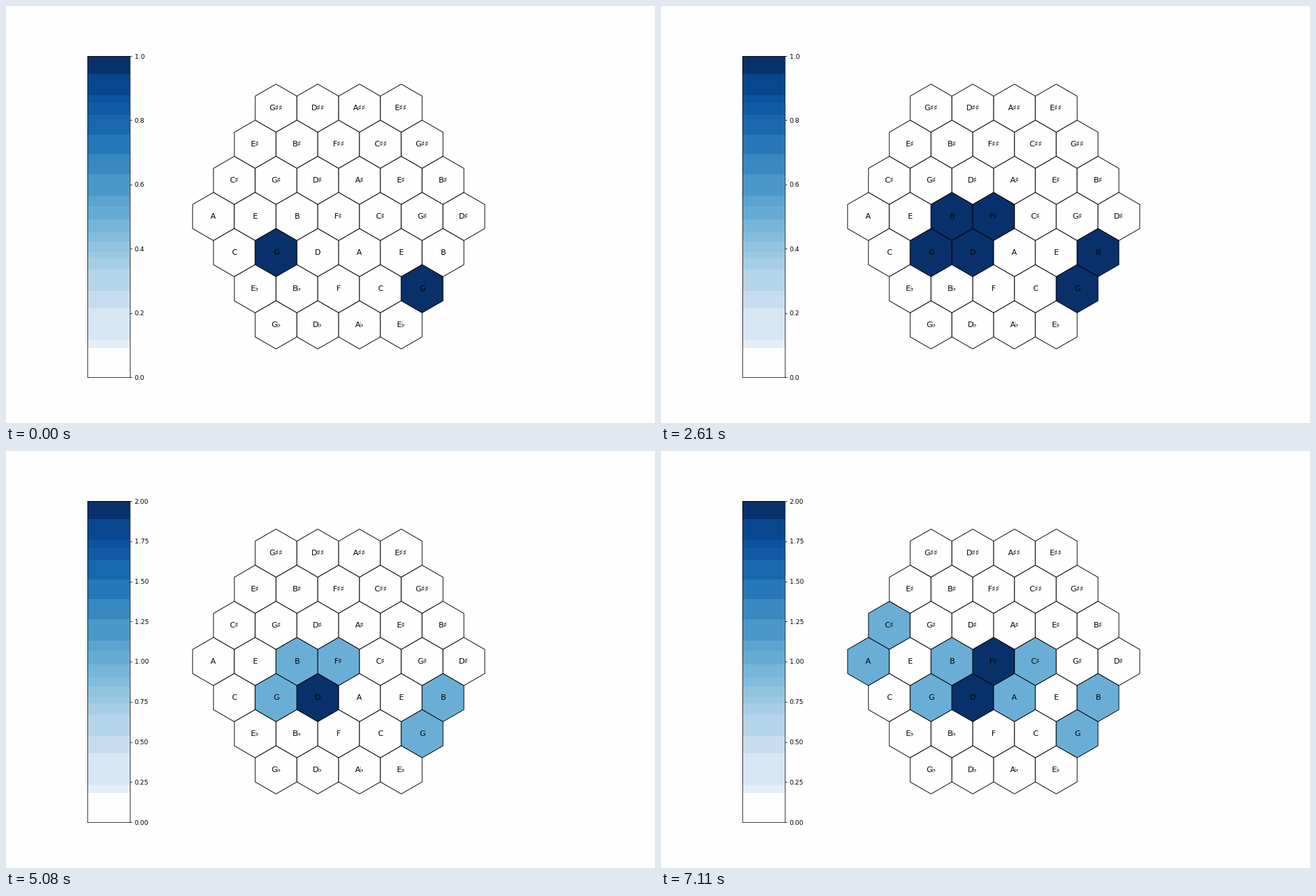
A matplotlib script that plays this animation: 933 px wide and 600 px high, repeating every 8000 ms.

```python
import numpy as np
import matplotlib.pyplot as plt
from matplotlib.animation import FuncAnimation
from matplotlib.collections import PolyCollection
from matplotlib.colors import ListedColormap

W, H, DPI = 933, 600, 64
PT = (200 / 3) / DPI          # point sizes are meant for 66.67 dpi
STEP, LOOP = 20, 8000         # ms
PAPER = (0.995, 0.995, 0.995, 1)
BLUES = plt.get_cmap("Blues")

# Tone lattice, top row first
ROWS = [
    "G♯♯ D♯♯ A♯♯ E♯♯",
    "E♯ B♯ F♯♯ C♯♯ G♯♯",
    "C♯ G♯ D♯ A♯ E♯ B♯",
    "A E B F♯ C♯ G♯ D♯",
    "C G D A E B",
    "E♭ B♭ F C G",
    "G♭ D♭ A♭ E♭",
]
PITCH = 60
CENTER = (478.2, 302.9)

# Start time, top of the scale, notes that sound (repeats add up)
STAGES = [
    (0, 1, "G"),
    (500, 1, "G B D F♯"),
    (4020, 2, "G B D F♯ D"),
    (5780, 2, "G B D F♯ D F♯ A C♯"),
]

BAR_LEFT, BAR_RIGHT, BAR_TOP, BAR_BOTTOM = 116.67, 178.2, 72, 534
BAND_EDGES = [534, 492, 480, 435, 410, 379, 363, 354, 339, 326, 307,
              288, 273, 242, 213, 185, 157, 139, 128, 98, 72]

fig = plt.figure(figsize=(W / DPI, H / DPI), dpi=DPI, facecolor=PAPER)


def make_cells():
    cells = []
    for r, row in enumerate(ROWS):
        names = row.split()
        y = CENTER[1] + (r - 3) * PITCH * np.sqrt(3) / 2
        for c, name in enumerate(names):
            x = CENTER[0] + (c - (len(names) - 1) / 2) * PITCH
            cells.append((name, x, y))
    return cells


def hexagon(x, y):
    a = np.pi / 6 + np.arange(6) * np.pi / 3
    r = PITCH / np.sqrt(3)
    return np.column_stack([x + r * np.cos(a), y + r * np.sin(a)])


def make_bar(top, step, digits):
    ax = fig.add_axes([BAR_LEFT / W, 1 - BAR_BOTTOM / H,
                       (BAR_RIGHT - BAR_LEFT) / W, (BAR_BOTTOM - BAR_TOP) / H])
    edges = (BAR_BOTTOM - np.array(BAND_EDGES)) / (BAR_BOTTOM - BAR_TOP)
    mids = (edges[:-1] + edges[1:]) / 2
    colors = [PAPER] + [BLUES(m) for m in mids[1:-1]] + [BLUES(1.0)]
    ax.pcolormesh([0, 1], edges, np.arange(len(mids))[:, None],
                  cmap=ListedColormap(colors))
    ax.set(xlim=(0, 1), ylim=(0, 1), xticks=[])
    values = np.arange(0, top + step / 2, step)
    ax.set_yticks(values / top, [f"{v:.{digits}f}" for v in values])
    ax.yaxis.tick_right()
    ax.tick_params(length=3.5 * PT, width=0.8 * PT, pad=3.5 * PT,
                   labelsize=10 * PT)
    for spine in ax.spines.values():
        spine.set_linewidth(0.8 * PT)
    return ax


def cell_colors(top, notes):
    notes = notes.split()
    counts = [notes.count(name) for name, _, _ in cells]
    return [BLUES(n / top) if n else PAPER for n in counts]


cells = make_cells()
stage = fig.add_axes([0, 0, 1, 1])
stage.set(xlim=(0, W), ylim=(H, 0))
stage.axis("off")
grid = PolyCollection([hexagon(x, y) for _, x, y in cells],
                      edgecolors="black", linewidths=1.0 * PT)
stage.add_collection(grid, autolim=False)
for name, x, y in cells:
    stage.text(x, y, name, ha="center", va="center", size=12 * PT,
               family="DejaVu Sans", color="black")

bars = {1: make_bar(1, 0.2, 1), 2: make_bar(2, 0.25, 2)}


def draw(frame):
    t = frame * STEP
    _, top, notes = [s for s in STAGES if s[0] <= t][-1]
    grid.set_facecolor(cell_colors(top, notes))
    for key, bar in bars.items():
        bar.set_visible(key == top)
    return [grid]


anim = FuncAnimation(fig, draw, frames=LOOP // STEP, interval=STEP,
                     init_func=lambda: draw(0), repeat=True, repeat_delay=0)
plt.show()
```
